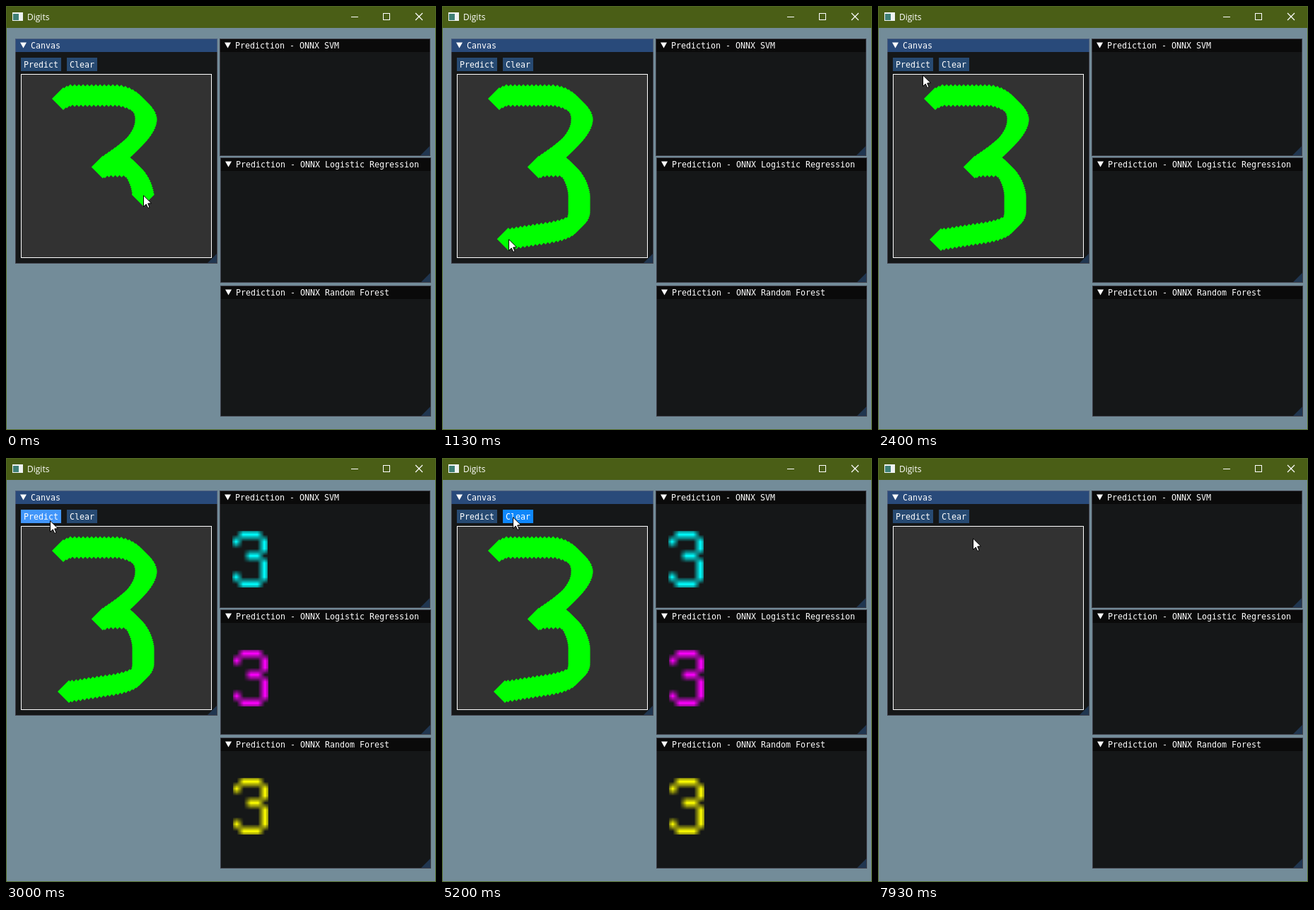
These frames come from a looping animation (608 px wide and 599 px high, 8 s). An HTML page with a canvas:

```html
<!DOCTYPE html>
<html lang="en">
<head>
<meta charset="utf-8">
<title>Digits</title>
<style>
html, body { margin: 0; width: 100%; height: 100%; overflow: hidden; background: #738c99; }
canvas { display: block; }
</style>
</head>
<body>
<canvas id="stage" width="608" height="599"></canvas>
<script>
const LOOP = 8000, STEP = 200 / 3;
const PREDICT = { down: 2867, up: 3000 }, CLEAR = { down: 5200, up: 5667 };
const ctx = document.getElementById('stage').getContext('2d');

// The handwritten stroke and the brush dabs along it, denser where it runs upright
const stroke = document.createElementNS('http://www.w3.org/2000/svg', 'path');
stroke.setAttribute('d', `M81 131 L90 126.5 H156 C176 126.5 198 144 198 160 C198 182 170 206 136 228
  L146 226 H166 C180 226 194 252 194 270 V290 C194 312 170 318 140 322 L89 330`);
const strokeLength = stroke.getTotalLength();
const dabs = sampleStroke();

// Pointer moves after the stroke
const moves = [
  { start: 1600, end: 2667, from: [89, 330], to: [62, 88] },
  { start: 3733, end: 4133, from: [62, 88], to: [100, 83] },
  { start: 6000, end: 6333, from: [100, 83], to: [116, 575], hide: true },
  { start: 7395, end: 7933, from: [37, 447], to: [134, 113] }
];

const predictions = [[320, 103, '#0ff'], [321, 271, '#f0f'], [321, 452, '#ff0']]
  .map(([x, y, color]) => ({ x, y, image: makeDigit(color) }));

function progress(t, start, end) {
  return Math.min(1, Math.max(0, (t - start) / (end - start)));
}

function easeOut(u) {
  return 1 - (1 - u) ** 2.4;
}

function pointOn(s) {
  const { x, y } = stroke.getPointAtLength(s);
  return [x, y];
}

function sampleStroke() {
  const out = [];
  for (let s = 0; s < strokeLength;) {
    const [x, y] = pointOn(s), [nextX] = pointOn(s + 1);
    out.push({ s, x, y });
    s += 2 + 4 * Math.abs(nextX - x);
  }
  return out;
}

// Length of stroke drawn: one short pull, a rest, then a long pull that slows down
function penAt(t) {
  return strokeLength - 144 + 30 * progress(t, 0, 333) + 114 * easeOut(progress(t, 400, 1400));
}

function pointerAt(t) {
  const move = moves.findLast(m => m.start <= t);
  if (!move) return pointOn(penAt(t)).map(Math.round);
  const u = progress(t, move.start, move.end);
  if (move.hide && u > 0.99) return null;
  return move.from.map((v, i) => Math.round(v + (move.to[i] - v) * easeOut(u)));
}

// One pixel per cell with a clear margin, so that scaling softens the edges
function makeDigit(color) {
  const rows = ['.###.', '#...#', '....#', '..##.', '....#', '....#', '#...#', '.###.'];
  const cell = document.createElement('canvas');
  cell.width = 7;
  cell.height = 10;
  const c = cell.getContext('2d');
  c.fillStyle = color;
  rows.forEach((row, y) => [...row].forEach((ch, x) => {
    if (ch === '#') c.fillRect(x + 1, y + 1, 1, 1);
  }));
  return cell;
}

function rect(x, y, w, h, color) {
  ctx.fillStyle = color;
  ctx.fillRect(x, y, w, h);
}

function frame(x, y, w, h, color) {
  ctx.strokeStyle = color;
  ctx.lineWidth = 1;
  ctx.strokeRect(x + 0.5, y + 0.5, w - 1, h - 1);
}

function shape(points, color, dx, dy) {
  ctx.beginPath();
  points.forEach(([x, y]) => ctx.lineTo(x + dx, y + dy));
  ctx.closePath();
  ctx.fillStyle = color;
  ctx.fill();
}

function text(str, x, y, font = '11.63px "DejaVu Sans Mono", monospace') {
  ctx.font = font;
  ctx.fillStyle = '#fff';
  ctx.fillText(str, x, y);
}

function panel(title, x, y, w, h, bar = '#0a0a0a') {
  rect(x, y, w, h, '#151718');
  rect(x, y, w, 19, bar);
  shape([[0, -13], [0, 0], [-13, 0]], '#203650', x + w - 1, y + h - 1);
  frame(x, y, w, h, 'rgba(110,110,128,0.5)');
  shape([[-4.5, -4], [4.5, -4], [0, 4]], '#fff', x + 11.5, y + 9.5);
  text(title, x + 22, y + 14);
}

function button(label, x, w, pointer, pressed) {
  const over = pointer && pointer[0] > x && pointer[0] < x + w && pointer[1] >= 73 && pointer[1] < 92;
  rect(x, 73, w, 19, pressed ? '#0f87fa' : over ? '#4296fa' : '#274a72');
  text(label, x + 4, 87);
}

function prediction({ x, y, image }) {
  ctx.save();
  ctx.beginPath();
  ctx.rect(x, y, 50, 80);
  ctx.clip();
  ctx.drawImage(image, x - 10, y - 10, 70, 100);
  ctx.restore();
}

function titleBar() {
  rect(0, 0, 608, 31, '#4a5e16');
  rect(9, 9, 15, 12, '#eef2f2');
  rect(10, 11, 8, 9, '#3f8076');
  text('Digits', 30, 20, '12px "Open Sans", sans-serif');
  rect(488, 15, 10, 1, '#fff');
  frame(533, 10, 10, 10, '#fff');
  ctx.lineWidth = 1.2;
  ctx.beginPath();
  for (const side of [-5, 5]) {
    ctx.moveTo(584 - side, 10);
    ctx.lineTo(584 + side, 20);
  }
  ctx.stroke();
}

function arrow([x, y]) {
  shape([[0.5, 0.8], [0.5, 16.5], [4.2, 13], [6.8, 18.5], [9, 17.5], [6.7, 12], [11.5, 11.7]], '#fff', x, y);
  ctx.strokeStyle = '#000';
  ctx.lineWidth = 1;
  ctx.stroke();
}

function render(t) {
  const pointer = pointerAt(t);
  const between = (a, b) => t > a - 4 && t < b - 4;

  rect(0, 0, 608, 599, '#738c99');
  titleBar();
  frame(0, 0, 608, 599, '#536b27');

  panel('Canvas', 13, 46, 286, 318, '#294a7a');
  panel('Prediction - ONNX SVM', 302, 46, 298, 166);
  panel('Prediction - ONNX Logistic Regression', 303, 214, 298, 177);
  panel('Prediction - ONNX Random Forest', 303, 395, 298, 185);

  button('Predict', 21, 57, pointer, between(PREDICT.down, PREDICT.up));
  button('Clear', 86, 43, pointer, between(CLEAR.down, CLEAR.up));

  rect(21, 96, 270, 260, '#323232');
  frame(21, 96, 270, 260, '#fff');

  if (between(0, CLEAR.up)) {
    const pen = penAt(t), [x, y] = pointOn(pen);
    for (const dab of [...dabs.filter(d => d.s < pen), { x, y }]) {
      shape([[-16, 0], [0, -16], [16, 0], [0, 16]], '#0f0', dab.x, dab.y);
    }
  }
  if (between(PREDICT.up, CLEAR.up)) predictions.forEach(prediction);
  if (pointer) arrow(pointer);
}

function tick() {
  const t = performance.now() % LOOP;
  render(Math.floor((t + 4) / STEP) * STEP % LOOP);
  requestAnimationFrame(tick);
}
tick();
</script>
</body>
</html>
```
